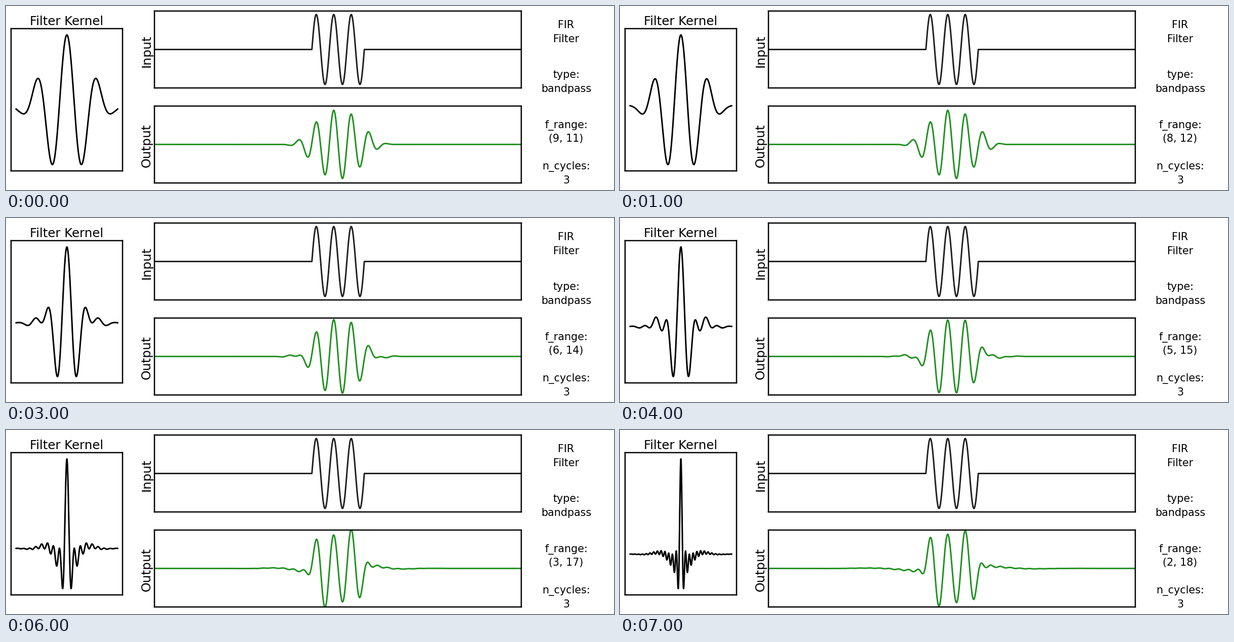
Animation, 1200 px wide and 366 px high, one loop 8 s. Source, as a matplotlib script:

```python
import numpy as np
import matplotlib.pyplot as plt
from matplotlib.animation import FuncAnimation

W, H, DPI = 1200, 366, 100
PT = 72 / DPI          # points per pixel
FS = 1000              # sampling rate, Hz
CENTER, CYCLES = 10, 3
LINE, FRAME = 3.0 * PT, 2.5 * PT

plt.rcParams["font.family"] = "DejaVu Sans"


def fir_kernel(lo, hi):
    """Hamming-windowed bandpass kernel with unit gain at its centre."""
    n = int(np.ceil(FS * CYCLES / lo)) | 1
    m = np.arange(n) - (n - 1) / 2
    a, b = 2 * lo / FS, 2 * hi / FS
    h = (b * np.sinc(b * m) - a * np.sinc(a * m)) * np.hamming(n)
    return h / np.sum(h * np.cos(np.pi * m * (a + b) / 2))


def make_axes(left, top, right, bottom):
    ax = fig.add_axes([left / W, 1 - bottom / H,
                       (right - left) / W, (bottom - top) / H])
    ax.set_xticks([])
    ax.set_yticks([])
    for spine in ax.spines.values():
        spine.set_linewidth(FRAME)
    return ax


def label(x, y, text, size, **kw):
    return fig.text(x / W, 1 - y / H, text, fontsize=size * PT,
                    ha="center", va="baseline", **kw)


fig = plt.figure(figsize=(W / DPI, H / DPI), dpi=DPI, facecolor="white")

# three-cycle sine burst in the middle of silence
t = np.arange(int(2.1 * FS)) / FS
burst = (t >= 0.9) & (t < 1.2)
signal = np.where(burst, np.sin(2 * np.pi * CENTER * (t - 0.9)), 0.0)

ax_kernel = make_axes(10, 44.7, 230.3, 328.3)
ax_in = make_axes(293.3, 10, 1017.3, 163)
ax_out = make_axes(293.3, 198.7, 1017.3, 352)
for ax in (ax_in, ax_out):
    ax.set_xlim(t[0], t[-1])
    ax.set_ylim(-1.1, 1.1)

kernel_line, = ax_kernel.plot([], [], color="black", lw=LINE)
ax_in.plot(t, signal, color="#212121", lw=LINE)
out_line, = ax_out.plot([], [], color="#219121", lw=LINE)
ax_kernel.set_xlim(-0.05, 1.05)

label(120, 37.5, "Filter Kernel", 24.4)
for y, name in ((89.5, "Input"), (277.5, "Output")):
    label(285, y, name, 25, rotation=90, rotation_mode="anchor")

notes = ((44.3, "FIR"), (71.5, "Filter"), (143.5, "type:"),
         (170.8, "bandpass"), (242.5, "f_range:"),
         (325.5, "n_cycles:"), (352.6, str(CYCLES)))
for y, text in notes:
    label(1105.5, y, text, 20.6)
band_text = label(1105.5, 270, "", 20.6)


def update(i):
    lo, hi = CENTER - 1 - i, CENTER + 1 + i
    h = fir_kernel(lo, hi)
    kernel_line.set_data(np.linspace(0, 1, len(h)), h)
    pad = 0.05 * np.ptp(h)
    ax_kernel.set_ylim(h.min() - pad, h.max() + pad)
    out_line.set_data(t, np.convolve(h, signal, "same"))
    band_text.set_text(f"({lo}, {hi})")
    return kernel_line, out_line, band_text


anim = FuncAnimation(fig, update, frames=8, interval=1000,
                     repeat=True, repeat_delay=0, blit=False)
plt.show()
```
